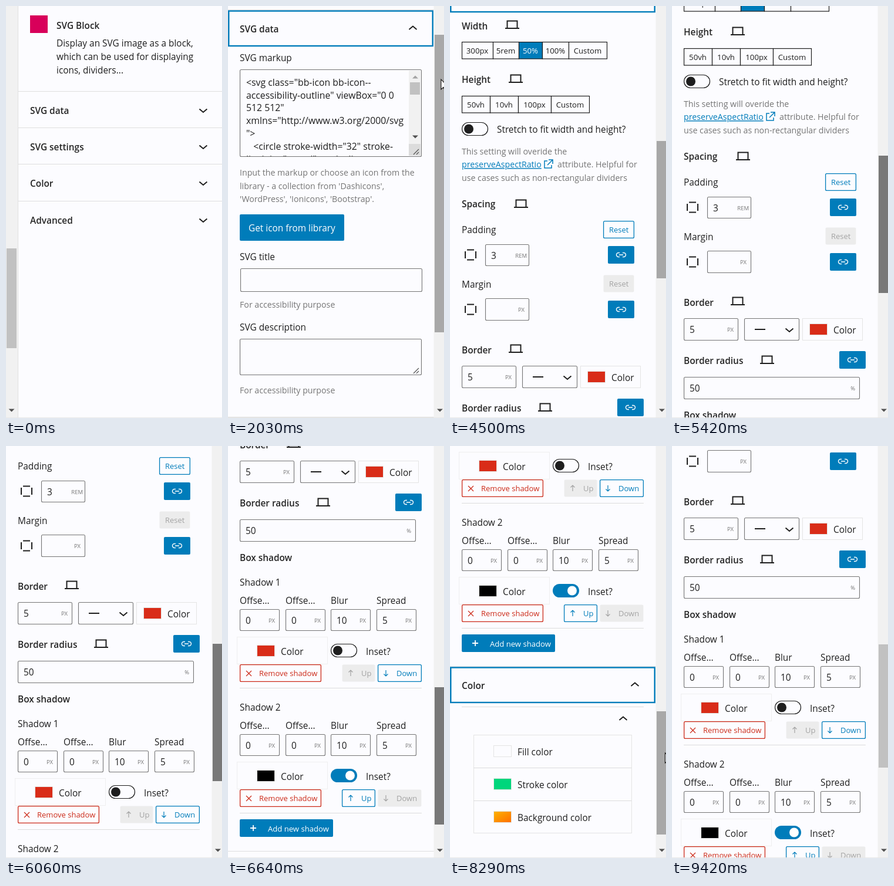
Recreate the animation shown at these times as an HTML page. Size 368 px wide and 702 px high, loop 9.6 s.

```html
<!DOCTYPE html>
<html lang="en">
<head>
<meta charset="utf-8">
<title>Block settings panel</title>
<style>
html, body { margin: 0; width: 100%; height: 100%; overflow: hidden; background: #fcfcff; }
svg { display: block; }
#stage { position: absolute; left: 0; top: 0; width: 368px; height: 702px; }
text { font-family: "Open Sans", "Noto Sans", sans-serif; white-space: pre; }
</style>
</head>
<body>
<svg id="stage" viewBox="0 0 368 702"></svg>
<script>
const INK = '#1e1e1e', MUTED = '#757575', BLUE = '#007cba', RED = '#cc2a18', SWATCH_RED = '#d92c18',
  PALE = '#f1f1f1', FAINT = '#e4e4e4', PAPER = '#fcfcff', THUMB = '#c1c1c1', ARROW = '#505050', OFF = '#a3a3a3';
const LOOP = 9600;

// Drawing helpers; text is placed by the vertical centre of its capitals.
const text = (x, cy, s, { size = 15.4, fill = INK, weight = 400, anchor = 'start', extra = '' } = {}) =>
  `<text x="${x}" y="${cy + size * 0.39}" font-size="${size}" fill="${fill}" font-weight="${weight}" text-anchor="${anchor}" ${extra}>${s.replace(/</g, '&lt;')}</text>`;
const bold = (x, cy, s) => text(x, cy, s, { weight: 600, fill: '#262626' });
const note = (x, cy, s) => text(x, cy - .4, s, { size: 14.2, fill: MUTED });
const rect = (x0, y0, x1, y1, fill, stroke = 'none', width = 1, r = 0) =>
  `<rect x="${x0}" y="${y0}" width="${x1 - x0}" height="${y1 - y0}" fill="${fill}" stroke="${stroke}" stroke-width="${width}" rx="${r}"/>`;
const path = (d, stroke = INK, width = 2, fill = 'none') =>
  `<path d="${d}" stroke="${stroke}" stroke-width="${width}" fill="${fill}"/>`;
const rule = (y, x0 = 20, x1 = 330) => path(`M${x0} ${y}H${x1}`, '#dcdcdc', 1);
const group = (x, y, body, id = '') => `<g id="${id}" transform="translate(${x} ${y})">${body}</g>`;

const chevron = (x, y, up) => path(`M${x - 6.5} ${y + (up ? 3 : -2.5)}l6.5 ${up ? -5.5 : 5.5} 6.5 ${up ? 5.5 : -5.5}`);
const triangle = (x, y, fill, up) => path(`M${x - 5} ${y + (up ? 2.5 : -2.5)}h10l-5 ${up ? -5 : 5}z`, 'none', 0, fill);
const grip = (x, y) => path(`M${x} ${y}l9 -9M${x + 5} ${y}l4 -4`, '#555', 1.2);
const box = (x0, y0, x1, y1) => rect(x0 + .5, y0 + .5, x1 - .5, y1 - .5, PAPER, '#757575', 1.1, 2);
const field = (x0, y0, x1, y1, value, unit, pad = 8) => {
  const cy = (y0 + y1) / 2;
  return box(x0, y0, x1, y1) + text(x0 + 10, cy, value) +
    text(x1 - pad, cy + .7, unit, { size: 9.5, fill: MUTED, anchor: 'end' });
};
const laptop = (x, y) => path(`M${x - 8.5} ${y + 5}v-11.5h17v11.5M${x - 12} ${y + 6}h24`);
const sides = (x, y) => path(`M${x - 6} ${y - 8.5}h12M${x - 6} ${y + 8.5}h12M${x - 9} ${y - 6}v12M${x + 9} ${y - 6}v12`);
const link = (x, y) => rect(x, y, x + 45, y + 30, BLUE, 'none', 0, 2) +
  path(`M${x + 20} ${y + 11.5}h-2a3.5 3.5 0 0 0 0 7h2M${x + 25} ${y + 11.5}h2a3.5 3.5 0 0 1 0 7h-2M${x + 19} ${y + 15}h7`, '#fff', 1.4);
const toggle = (y, on, x = 175) => on
  ? rect(x, y, x + 45, y + 23, BLUE, 'none', 0, 11.5) + `<circle cx="${x + 33}" cy="${y + 11.5}" r="8" fill="#fff"/>`
  : rect(x + .5, y + .5, x + 44.5, y + 22.5, PAPER, INK, 1.2, 11) + `<circle cx="${x + 12}" cy="${y + 11.5}" r="8" fill="${INK}"/>`;
const swatch = (x, y, fill) => rect(x + .5, y + .5, x + 30.5, y + 19.5, fill, FAINT);
const button = (x0, y0, x1, label, color, tx) =>
  rect(x0 + .6, y0 + .6, x1 - .6, y0 + 29.4, color ? PAPER : '#ececec', color || 'none', 1.3, 2) +
  text(tx, y0 + 14.7, label, { size: 13, fill: color || OFF });
const arrow = (x, y, up, color) => {
  const d = up ? -1 : 1;
  return path(`M${x} ${y - 5}v10M${x - 3.5} ${y + d * 1.5}l3.5 ${d * 3.5} 3.5 ${-d * 3.5}`, color || OFF, 1.2);
};
const choices = (y, edges, labels, active) => labels.map((label, i) =>
  rect(edges[i] + .5, y + .5, edges[i + 1] + .5, y + 29, i === active ? BLUE : PAPER, INK, 1.2) +
  text((edges[i] + edges[i + 1]) / 2, y + 14.7, label, { size: 13.2, anchor: 'middle', fill: i === active ? '#fff' : INK })).join('');

function intro() {
  return rect(20, 16, 50, 46, '#d8005a') + bold(65, 32.5, 'SVG Block') +
    ['Display an SVG image as a block,', 'which can be used for displaying', 'icons, dividers...']
      .map((s, i) => text(65, 63.4 + 23 * i, s)).join('');
}

function dataBody() {
  const markup = ['<svg class="bb-icon bb-icon--', 'accessibility-outline" viewBox="0 0', '512 512"',
    'xmlns="http://www.w3.org/2000/svg', '">', '   <circle stroke-width="32" stroke-', 'linejoin="round" stroke-linecap'];
  const lines = markup.map((s, i) => text(10, 20.5 + 21.9 * i, s, { size: 15.8 })).join('');
  return text(20, 87.5, 'SVG markup') + box(20, 108, 330, 257) +
    `<svg x="21" y="109" width="286" height="147">${lines}</svg>` +
    rect(308, 110, 328, 235, PALE) + rect(310, 130, 327, 151, THUMB) + rect(308, 235, 328, 255, '#dcdcdc') +
    triangle(319, 121, OFF, true) + triangle(319, 223, ARROW) + grip(316, 253) +
    note(20, 284, 'Input the markup or choose an icon from the') +
    note(20, 306.5, "library - a collection from 'Dashicons',") +
    note(20, 329, "'WordPress', 'Ionicons', 'Bootstrap'.") +
    rect(20, 355, 198, 400, BLUE, 'none', 0, 2) + text(35, 378, 'Get icon from library', { fill: '#fff' }) +
    text(20, 427.3, 'SVG title') + box(21, 447, 331, 487) + note(20, 508.5, 'For accessibility purpose') +
    text(20, 546.5, 'SVG description') + box(20, 567, 330, 629) + grip(316, 626) +
    note(20, 655, 'For accessibility purpose');
}

function sizeAndBorder() {
  return bold(20, -47, 'Width') + laptop(106, -49) +
    choices(-20, [20, 73, 117, 157, 202, 267], ['300px', '5rem', '50%', '100%', 'Custom'], 2) +
    bold(20, 44, 'Height') + laptop(112, 43) +
    choices(72, [20, 68, 116, 172, 237], ['50vh', '10vh', '100px', 'Custom']) +
    toggle(117, false, 20) + text(80, 129, 'Stretch to fit width and height?') +
    note(20, 167, 'This setting will overide the') +
    text(20, 188.6, 'preserveAspectRatio', { size: 14.2, fill: BLUE, extra: 'text-decoration="underline"' }) +
    path('M166 183h-5v12h12v-5M168 181h7v7M175 181l-9 9', BLUE, 1.5) +
    note(183, 189, 'attribute. Helpful for') + note(20, 212, 'use cases such as non-rectangular dividers') +
    bold(20, 256, 'Spacing') + laptop(121, 256) +
    text(20, 300, 'Padding') + button(261, 285, 314, 'Reset', BLUE, 271) +
    sides(35, 343) + field(60, 325, 135, 362, '3', 'REM', 4) + link(269, 328) +
    text(20, 393, 'Margin') + button(261, 377, 314, 'Reset', '', 271) +
    sides(35, 436) + field(60, 417, 135, 455, '', 'PX') + link(269, 421) +
    bold(20, 504.5, 'Border') + laptop(112, 503) + field(20, 532, 113, 570, '5', 'PX') +
    box(123, 532, 217, 570) + path('M141 551h18') + chevron(200, 552) +
    rect(222.5, 532.5, 324.5, 569.5, 'none', FAINT) + swatch(234, 541, SWATCH_RED) + text(275, 552, 'Color') +
    bold(20, 604, 'Border radius') + laptop(162, 603) + link(285, 588) +
    field(20, 632, 320, 670, '50', '%') + bold(20, 697, 'Box shadow');
}

function shadow(n, color, first) {
  const names = ['Offse...', 'Offse...', 'Blur', 'Spread'], values = ['0', '0', '10', '5'];
  const up = first ? '' : BLUE, down = first ? BLUE : '';
  return text(20, 232, 'Shadow ' + n) +
    names.map((name, i) => {
      const x = Math.round(20 + 77.6 * i);
      return text(x, 263, name) + field(x, 278, x + 68, 315, values[i], 'PX');
    }).join('') +
    rect(15.5, 325.5, 169.5, 371.5, 'none', '#efefef') + swatch(49, 339, color) + text(90, 350, 'Color') +
    toggle(337, !first) + text(235, 350, 'Inset?') +
    button(20, 372, 159, 'Remove shadow', RED, 53) + path('M31 383l9 9M40 383l-9 9', RED, 1.2) +
    button(194, 372, 251, 'Up', up, 227) + arrow(209, 387, true, up) +
    button(255, 372, 330, 'Down', down, 287) + arrow(269, 387, false, down) + rule(412.5);
}

function shadows() {
  return shadow(1, SWATCH_RED, true) + group(0, 213, shadow(2, '#000', false)) +
    rect(20, 636, 179, 666, BLUE, 'none', 0, 2) + path('M38 651h10M43 646v10', '#fff', 1.8) +
    text(68, 651.7, 'Add new shadow', { size: 13.1, fill: '#fff' });
}

function colorBody() {
  const items = [['Fill color', PAPER], ['Stroke color', '#00d67c'], ['Background color', 'url(#sunset)']];
  return rule(444.5) + chevron(295, 464, true) + rect(40.5, 492.5, 309.5, 659.5, 'none', FAINT) +
    items.map(([name, fill], i) => (i ? rule(492.5 + 56 * i, 40, 309) : '') +
      swatch(74, 510 + 56 * i, fill) + text(115, 521 + 56 * i, name)).join('');
}

// Panels: closed header centre, extra height when open, opening time, hover span.
const panels = [
  { id: 'data', label: 'SVG data', cy: 178, grow: 632, open: 470, hover: [340, 470], body: group(0, 139, dataBody()) },
  { id: 'settings', label: 'SVG settings', cy: 240, grow: 1268, open: 3620, hover: [3370, 3620],
    body: group(0, 972, sizeAndBorder()) + group(0, 1479, shadows()) },
  { id: 'color', label: 'Color', cy: 302, grow: 263, open: 7600, hover: [7400, 7600], body: group(0, 1794, colorBody()) },
  { id: 'advanced', label: 'Advanced', cy: 365, grow: 0, open: Infinity, hover: [0, 0], body: '' }
];

const header = p => group(0, 0,
  `<rect id="${p.id}-hover" y="-32" width="350" height="62" fill="#f0f0f0"/>` +
  `<rect id="${p.id}-focus" x="1.25" y="-30.5" width="347.5" height="59.5" fill="none" stroke="${BLUE}" stroke-width="2.4"/>` +
  path('M0 -32.5H368', '#dedede', 1) + bold(20, .2, p.label) +
  `<g id="${p.id}-down">${chevron(315, 0)}</g><g id="${p.id}-up">${chevron(315, -2, true)}</g>`, p.id);

const stage = document.getElementById('stage');
stage.innerHTML =
  '<defs><linearGradient id="sunset" x2="1" y2="1"><stop stop-color="#fcb400"/><stop offset="1" stop-color="#ff6d00"/></linearGradient></defs>' +
  rect(0, 0, 368, 702, PAPER) +
  group(0, 0,
    rect(-21, 0, 0, 702, PALE) + rect(-20, 413, -3, 583, THUMB) + triangle(-11.5, 689, ARROW) +
    path('M-.5 0V702', '#e0e0e0', 1) +
    group(0, 0, intro() + panels.map(p => `<g id="${p.id}-body">${p.body}</g>` + header(p)).join(''), 'content'), 'panel') +
  group(0, 0, rect(350.5, 0, 368, 702, PALE) + '<rect id="thumb" x="352" width="16"/>' +
    `<g id="arrow">${triangle(361, 689, 'currentColor')}</g>`, 'bar') +
  path('M0 701.5H368', '#e8e8e8', 1) +
  group(0, 0, path('M0 0V17l4-3.5 2.6 6 2.8-1.2L6.8 12.5H12z', '#111', 1.1, '#fff'), 'pointer') +
  group(0, 0, path('M-2 12V2a1.8 1.8 0 0 1 3.6 0V8q3.2-1 3.6.6 3-.6 3.2.9 2.6-.3 2.6 2v4.5q0 2-1.6 4.5v2.5h-9v-1.5L-6 13.5q0-2.5 2.2-1.8z', '#111', 1.1, '#fff') +
    path('M1.6 8v4M5.2 9v3.5M8.4 10v3', '#111', .9), 'hand');

const el = {};
stage.querySelectorAll('[id]').forEach(node => { el[node.id] = node; });
const show = (node, on) => node.setAttribute('display', on ? 'inline' : 'none');
const move = (node, x, y) => node.setAttribute('transform', `translate(${x} ${y})`);
const within = (t, spans) => spans.some(([a, b]) => t >= a && t < b);

// Each key is [time, values..., 'line' for an even run up to it].
const scrollKeys = [[0, 0], [480, 0], [980, 139], [2170, 139], [2750, 326], [3630, 326], [4560, 898],
  [5000, 898], [5420, 972, 'line'], [6640, 1479, 'line'], [7040, 1594, 'line'], [7610, 1594],
  [8080, 1794], [8640, 1794], [9400, 1382]];
const cursorKeys = [[80, 400, 330], [420, 325, 180], [1050, 325, 180], [1400, 200, 330], [1710, 150, 520],
  [1870, 150, 520], [2020, 363, 125], [2170, 363, 125], [2750, 363, 249], [2930, 363, 249], [3410, 317, 550],
  [4150, 317, 550], [4560, 374, 350], [7060, 374, 640], [7460, 317, 598], [7700, 317, 598], [8270, 366.5, 523],
  [8640, 366.5, 523], [8800, 376, 490]];

function sample(keys, t, k = 1) {
  if (t <= keys[0][0]) return keys[0][k];
  const i = keys.findIndex(key => key[0] > t);
  if (i < 0) return keys[keys.length - 1][k];
  const a = keys[i - 1], b = keys[i];
  let u = (t - a[0]) / (b[0] - a[0]);
  if (b[2] !== 'line') u = u * u * (3 - 2 * u);
  return a[k] + (b[k] - a[k]) * u;
}

function draw(t) {
  const opened = t >= panels[0].open;
  const scroll = Math.round(sample(scrollKeys, t));
  const focused = panels.filter(p => t >= p.open).pop();
  let shift = 0;
  for (const p of panels) {
    const open = t >= p.open;
    move(el[p.id], 0, p.cy + shift);
    show(el[p.id + '-body'], open);
    show(el[p.id + '-up'], open);
    show(el[p.id + '-down'], !open);
    show(el[p.id + '-focus'], p === focused);
    show(el[p.id + '-hover'], within(t, [p.hover]));
    if (open) shift += p.grow;
  }
  move(el.panel, opened ? 0 : 21, 0);
  move(el.content, 0, -scroll);

  const view = 761, track = 724, maxScroll = 365 + shift - 671;
  const ratio = track / (maxScroll + view);
  const dragging = within(t, [[2170, 2800], [5000, 7070], [8640, 9400]]);
  const over = within(t, [[1990, 2990], [4480, 7120], [8200, 9400]]);
  show(el.bar, opened);
  el.thumb.setAttribute('y', Math.round(-44 + scroll * ratio));
  el.thumb.setAttribute('height', Math.round(view * ratio));
  el.thumb.setAttribute('fill', dragging ? '#787878' : over ? '#a8a8a8' : THUMB);
  el.arrow.setAttribute('color', scroll > maxScroll - 1 ? OFF : ARROW);

  const x = sample(cursorKeys, t), y = sample(cursorKeys, t, 2);
  const hand = within(t, [[340, 1080], [3340, 4200], [7380, 7760]]);
  move(el.pointer, x, y);
  move(el.hand, x, y);
  show(el.pointer, !hand);
  show(el.hand, hand);
}

const start = performance.now();
function tick() {
  draw((performance.now() - start) % LOOP);
  requestAnimationFrame(tick);
}
draw(0);
requestAnimationFrame(tick);
</script>
</body>
</html>
```
